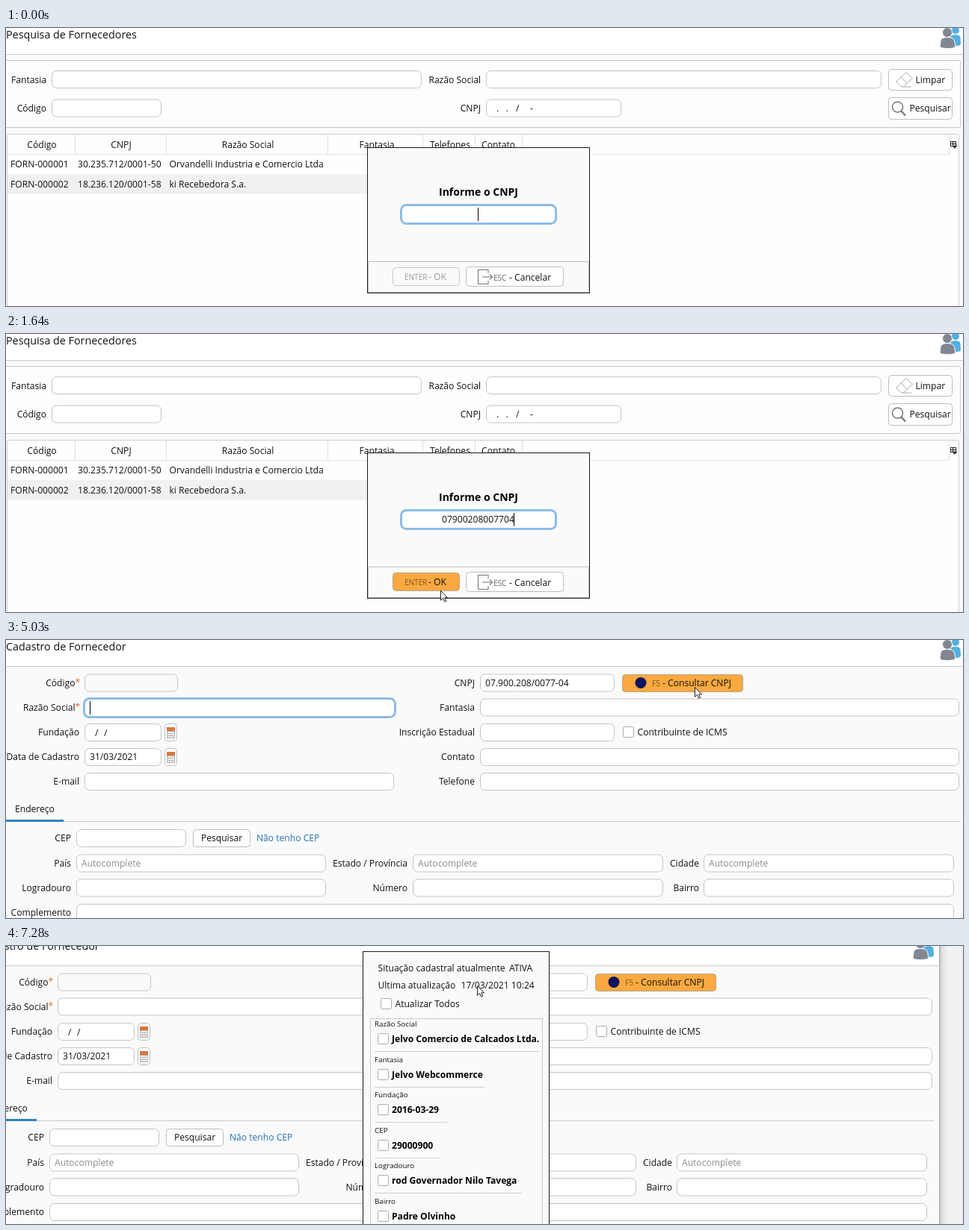
Animation, 1280 px wide and 373 px high, one loop 8 s. Source, as an HTML page:

```html
<!DOCTYPE html>
<html lang="pt-BR">
<head>
<meta charset="utf-8">
<title>Cadastro de Fornecedor</title>
<style>
  html, body { margin: 0; width: 100%; height: 100%; overflow: hidden; background: #fff; }
  svg { display: block; width: 1280px; height: 373px; }
  text { font: 12.1px "Open Sans", "Noto Sans", sans-serif; fill: #111; white-space: pre; }
  .title { font-size: 14.3px; }
  .mid { text-anchor: middle; }
  .end { text-anchor: end; }
  .bold { font-weight: 700; fill: #000; }
  .head { font-size: 14px; }
  .small { font-size: 10px; fill: #666; }
  .tiny { font-size: 9.8px; }
  .hint { fill: #8c8c8c; }
  .off { fill: #9a9a9a; }
  .link { fill: #2572b0; }
  .star { fill: #d9702b; }
  .brown { fill: #7d5526; }
  .white { fill: #fff; }
</style>
</head>
<body>
<svg id="stage" xmlns="http://www.w3.org/2000/svg" viewBox="0 0 1280 373"></svg>
<script>
const LOOP = 8000;
const STARTS = [0, 500, 1640, 2770, 3900, 5030, 6170, 7280];

// ---- primitives: boxes take left, top, right, bottom ----
const text = (x, cy, s, cls = '') =>
  `<text x="${x}" y="${Math.round(cy + 4.3)}" class="${cls}">${s}</text>`;
const fill = (l, t, r, b, color) =>
  `<rect x="${l}" y="${t}" width="${r - l}" height="${b - t}" fill="${color}"/>`;
const box = (l, t, r, b, rx = 0, stroke = '#c4c4c4', bg = '#fff', w = 1) =>
  `<rect x="${l + .5}" y="${t + .5}" width="${r - l - 1}" height="${b - t - 1}" rx="${rx}"
    fill="${bg}" stroke="${stroke}" stroke-width="${w}"/>`;
const path = (d, stroke, w = 1, bg = 'none') =>
  `<path d="${d}" fill="${bg}" stroke="${stroke}" stroke-width="${w}"/>`;
const hline = (l, r, y, color) => fill(l, y, r, y + 1, color);
const vline = (x, t, b, color) => fill(x, t, x + 1, b, color);
const move = (x, y, s) => `<g transform="translate(${x} ${y})">${s}</g>`;
const layer = (steps, s) => `<g data-on="${steps}" display="none">${s}</g>`;

// ---- widgets ----
const field = (l, r, cy, bg) => box(l, cy - 12, r, cy + 12, 6, '#c4c4c4', bg);
const focus = (l, t, r, b) => box(l + 1, t + 1, r - 1, b - 1, 7, '#8dbbea', '#fff', 3);
const button = (l, t, r, b, bg = '#fff', edge = '#bdbdbd') => box(l, t, r, b, 4, edge, bg);
const check = (l, t) => box(l, t, l + 15, t + 15, 2, '#a9a9a9');
const caret = (x, t, b) => vline(x, t, b, '#000');
const pointer = (x, y) => move(x, y,
  path('M.5 .5V13.2L3.5 10.5L5.6 15.3L7.7 14.4L5.6 9.8H9.5Z', '#222', 1, '#fff'));
const glow = (x, y) => `<circle cx="${x}" cy="${y}" r="13" fill="#f5ea25" opacity=".62"/>`;

const people = `<g fill="#54aee2"><circle cx="1270" cy="3" r="5"/>
  <path d="M1263 12Q1264 9 1270 9Q1276 9 1276.500 13L1277 21Q1277 24 1270 24Z"/></g>
  <g fill="#808790" stroke="#fff"><circle cx="1259" cy="6" r="6.5"/>
  <path d="M1249 25L1250 17Q1251 12.500 1259 12.500Q1267 12.500 1268.500 17L1270 25Q1268 27.500 1259 27.500Q1250 27.500 1249 25Z"/></g>`;

const header = title => fill(0, 0, 1284, 35, '#fff') + hline(0, 1284, 35, '#cbcbcb') +
  text(0, 9.5, title, 'title') + people;

const calendar = cy => button(212, cy - 12, 229, cy + 12) +
  fill(215, cy - 7, 226, cy - 2, '#d9783f') + box(215, cy - 2, 226, cy + 8, 0, '#aaa', '#eee') +
  hline(217, 224, cy + 1, '#aaa') + hline(217, 224, cy + 4, '#aaa');

// ---- search screen ----
const columns = [[48, 'Código'], [154, 'CNPJ'], [323.5, 'Razão Social'],
  [496, 'Fantasia'], [594, 'Telefones'], [658.5, 'Contato']];
const row = (cy, ...cells) => cells.map((s, i) => text([6, 96, 218.5][i], cy, s)).join('');

const search = () => fill(0, 0, 1280, 373, '#fafafa') + header('Pesquisa de Fornecedores') +
  box(-3, 43, 1277, 134, 2, '#c6c6c6', '#fdfdfd') +
  text(54, 69.5, 'Fantasia', 'end') + field(61, 556, 69) +
  text(635, 69.5, 'Razão Social', 'end') + field(642, 1171, 69) +
  text(54, 108, 'Código', 'end') + field(61, 208, 107.5) +
  text(635, 108, 'CNPJ', 'end') + field(642, 823, 107.5) +
  text('656 668.5 682 701', 108, '../-') +
  button(1180, 55, 1266, 84) + text(1216.5, 69.5, 'Limpar') +
  path('M1191.5 71L1204 59.500L1212.500 67.500L1200 79L1197 78.500L1191.500 73ZM1197 66L1205.500 74M1200 79H1211', '#aaa') +
  button(1180, 93, 1266, 123) + text(1208.5, 108, 'Pesquisar') +
  '<circle cx="1192.500" cy="106" r="7" fill="none" stroke="#777" stroke-width="1.500"/>' +
  path('M1197.500 111.500L1203 117.500', '#777', 2.4) +
  box(1, 142, 1275, 390, 2, '#cfcfcf', '#fefefe') +
  hline(2, 1262, 169, '#e3e3e3') +
  [92, 214, 430, 557, 627, 690, 1261].map(x => vline(x, 143, 169, '#dedede')).join('') +
  columns.map(([x, s]) => text(x, 156.5, s, 'mid')).join('') +
  box(1263, 152, 1271, 159, 0, '#222') + hline(1263, 1271, 155, '#222') +
  vline(1266, 152, 159, '#222') + path('M1266 158H1272L1269 161.500Z', '#222', .5, '#222') +
  fill(2, 196, 690, 223, '#f1f1f1') +
  row(183, 'FORN-000001', '30.235.712/0001-50', 'Orvandelli Industria e Comercio Ltda') +
  row(209.5, 'FORN-000002', '18.236.120/0001-58', 'ki Recebedora S.a.');

const okButton = {
  off: () => button(517, 321, 607, 346, '#fafafa', '#c9c9c9') +
    text(533, 334, 'ENTER', 'small off') + text(565, 334, '- OK', 'off'),
  on: () => button(517, 321, 607, 346) + text(533, 334, 'ENTER', 'small') + text(565, 334, '- OK'),
  hover: () => button(517, 321, 607, 346, '#fba940', '#b5a58c') +
    text(533, 334, 'ENTER', 'small brown') + text(565, 334, '- OK'),
  down: () => box(516, 320, 610, 347, 4, '#8dbbea', '#3471af', 3) +
    text(532, 334, 'ENTER', 'small bold white') + text(566, 334, '- OK', 'bold white')
};

const cancelButton = () => button(615, 320, 746, 347) +
  path('M645 329V324.500H631.500V343.500H645V339M637 334H650.500M647 330.500L650.500 334L647 337.500', '#777', 1.1) +
  text(652, 334.5, 'ESC', 'small') + text(673, 334.5, '- Cancelar');

function prompt(ok, number, focused) {
  return box(483, 160, 781, 356, 0, '#1a1a1a', '#fafafa') +
    text(632, 220.5, 'Informe o CNPJ', 'mid bold head') +
    box(484, 313, 780, 355, 0, '#c2c2c2', '#fafafa') +
    (focused ? focus(527, 236, 737, 264) : box(529, 237, 735, 262, 7)) +
    text(583, 250, number) +
    (focused ? caret(number ? 679 : 631, 241, 259) : '') +
    okButton[ok]() + move(focused ? 0 : 2, 0, cancelButton());
}

// ---- supplier form ----
const required = (cy, s) => text(92.5, cy, s, 'end') + text(92.5, cy - 1, '*', 'star');
const label = (x, cy, s) => text(x, cy, s, 'end');
const auto = (l, r, cy) => field(l, r, cy) + text(l + 7, cy, 'Autocomplete', 'hint');

function lookup(state) {
  const hot = state === 'down', dx = hot ? -4 : 0;
  const skin = hot ? box(819, 45, 992, 71, 4, '#8dbbea', '#3471af', 3)
    : state === 'hover' ? button(824, 46, 986, 70, '#fba940', '#b5a58c') : button(824, 46, 986, 70);
  const tone = hot ? 'bold white' : '';
  return skin + `<circle cx="${849 + dx}" cy="57.500" r="7.500" fill="#11135f"/>` +
    text(864 + dx, 58, 'F5', 'small ' + (hot ? tone : state === 'hover' ? 'brown' : '')) +
    text(878 + dx, 58, '- Consultar CNPJ', tone);
}

function form(state, focused) {
  const dx = state === 'down' ? -4 : 0, L = 634 + dx, end = 627 + dx, left = 519 + dx;
  return fill(0, 0, 1284, 400, '#fafafa') + header('Cadastro de Fornecedor') +
    required(58, 'Código') + field(105, 230, 57.5, '#fafafa') +
    required(91, 'Razão Social') +
    (focused ? focus(103, 77, 522, 105) + caret(112, 82, 100) : field(105, left, 90.5)) +
    label(98, 124, 'Fundação') + field(105, 208, 124) + text('119 131', 124.5, '//') + calendar(124) +
    label(98, 157, 'Data de Cadastro') + field(105, 208, 157) + text(112, 157, '31/03/2021') + calendar(157) +
    label(98, 190, 'E-mail') + field(105, left, 190) +
    label(end, 58, 'CNPJ') + field(L, 814 + dx, 57.5) + text(L + 7, 58, '07.900.208/0077-04') +
    lookup(state) +
    label(end, 91, 'Fantasia') + field(L, 1275, 90.5) +
    label(end, 124, 'Inscrição Estadual') + field(L, 814 + dx, 124) +
    check(825 + dx, 116) + text(844.5 + dx, 124, 'Contribuinte de ICMS') +
    label(end, 157, 'Contato') + field(L, 1275, 157) +
    label(end, 190, 'Telefone') + field(L, 1275, 190) +
    text(12, 227, 'Endereço') + hline(0, 1277, 243, '#c8c8c8') + fill(0, 241, 77, 244, '#2f82c3') +
    label(87, 266, 'CEP') + field(94, 241, 266) +
    button(250, 254, 327, 278) + text(288.5, 266, 'Pesquisar', 'mid') +
    text(335, 266, 'Não tenho CEP', 'link') +
    label(87, 299.5, 'País') + auto(94, 428, 299.5) +
    label(537, 299.5, 'Estado / Província') + auto(544, 879, 299.5) +
    label(927, 299.5, 'Cidade') + auto(933, 1268, 299.5) +
    label(87, 332.5, 'Logradouro') + field(94, 428, 332.5) +
    label(537, 332.5, 'Número') + field(544, 879, 332.5) +
    label(927, 332.5, 'Bairro') + field(933, 1268, 332.5) +
    label(87, 366, 'Complemento') + field(94, 1268, 366);
}

// ---- lookup result: caption, value, right end of the rule ----
const results = [
  ['Razão Social', 'Jelvo Comercio de Calcados Ltda.', 713],
  ['Fantasia', 'Jelvo Webcommerce', 640],
  ['Fundação', '2016-03-29', 590],
  ['CEP', '29000900', 580],
  ['Logradouro', 'rod Governador Nilo Tavega', 690],
  ['Bairro', 'Padre Olvinho', 604]
];

const resultCard = () => box(477, 7, 727, 400, 0, '#1a1a1a', '#fafafa') +
  text(497.5, 30, 'Situação cadastral atualmente') + text(673, 30, 'ATIVA') +
  text(497.5, 53, 'Ultima atualização') + text(608.5, 53, '17/03/2021 10:24') +
  check(501, 70) + text(520.5, 78, 'Atualizar Todos') +
  box(487, 97, 718, 400, 0, '#c9c9c9', '#fafafa') +
  results.map(([name, value, end], i) => {
    const y = Math.round(125 + i * 47.6);
    return text(493, y - 21, name, 'tiny') + check(497, y - 8) +
      text(516, y, value, 'bold') + hline(493, end, y + 16, '#cfcfcf');
  }).join('');

const backdrop = `<defs><linearGradient id="shade">
  <stop offset="0" stop-color="#a8a8a8"/><stop offset=".25" stop-color="#dcdcdc"/>
  <stop offset="1" stop-color="#f1f1f1"/></linearGradient></defs>` +
  fill(0, 0, 1280, 373, '#f1f1f1') + fill(1248, 0, 1260, 373, 'url(#shade)');

const ibeam = path('M581.500 337.500H583L584 338.500L585 337.500H586.500M584 338.500V348.500M581.500 349.500H583L584 348.500L585 349.500H586.500', '#333');

// ---- scenes by step ----
const NUMBER = '07900208007704';
const stage = document.getElementById('stage');
stage.innerHTML =
  layer('0123', search()) +
  layer('0', prompt('off', '', true)) +
  layer('1', prompt('on', NUMBER, true)) +
  layer('2', move(0, -1, prompt('hover', NUMBER, true)) + pointer(581, 344)) +
  layer('3', move(0, -1, prompt('down', NUMBER, false)) + glow(582, 343) + pointer(582, 343)) +
  layer('4', form('idle', true) + ibeam) +
  layer('5', form('hover', true) + pointer(921, 63)) +
  layer('6', form('down', false) + glow(920, 62) + pointer(921, 63)) +
  layer('7', backdrop + move(-36, -9, form('hover', false)) + resultCard() + pointer(630, 53));

const layers = [...stage.querySelectorAll('[data-on]')];
let shown = -1;
function tick() {
  const now = performance.now() % LOOP;
  const step = STARTS.filter(t => t <= now).length - 1;
  if (step !== shown) {
    shown = step;
    for (const g of layers) g.setAttribute('display', g.dataset.on.includes(step) ? 'inline' : 'none');
  }
  requestAnimationFrame(tick);
}
tick();
</script>
</body>
</html>
```
